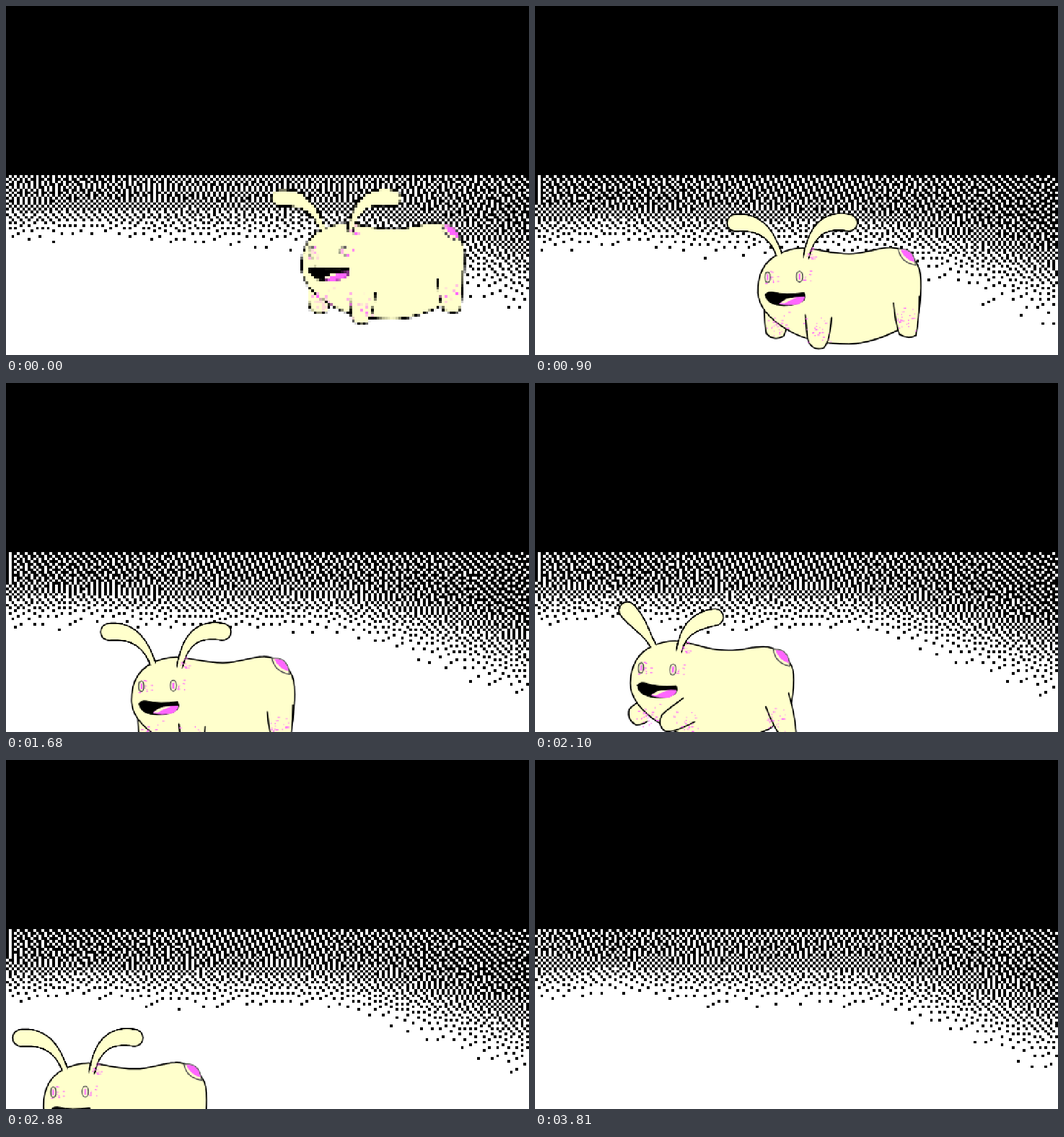
Animation, 917 px wide and 611 px high, one loop 3.87 s. Source, as an HTML page with a canvas:

```html
<!DOCTYPE html>
<html lang="en">
<head>
<meta charset="utf-8">
<title>Hopping bunny</title>
<style>
html, body { margin: 0; width: 100%; height: 100%; overflow: hidden; background: #000; }
canvas { display: block; width: 100%; height: 100%; image-rendering: pixelated; }
</style>
</head>
<body>
<canvas id="stage" width="917" height="611"></canvas>
<script>
const W = 917, H = 611, COLS = 192, ROWS = 128, CELL = W / COLS, HORIZON = 62;
const LOOP = 3870, STEP = 30, EXIT = 3810;
const GLOW = 1245;                          // one pulse of the floor light
const GAIT = 2310, STRIDE = 379, SET_OFF = 570;
const CREAM = '#ffffcc', PINK = '#ff66ff', GREY = '#555555';

const stage = document.getElementById('stage').getContext('2d');
stage.imageSmoothingEnabled = false;

function layer(width, height) {
  const c = document.createElement('canvas');
  c.width = width;
  c.height = height;
  const ctx = c.getContext('2d');
  ctx.imageSmoothingEnabled = false;
  return ctx;
}
const floor = layer(COLS, ROWS);
const sprite = layer(COLS * 3, ROWS * 3);
const coarse = layer(COLS, ROWS);
const dots = floor.createImageData(COLS, ROWS);

const clamp = v => Math.min(1, Math.max(0, v));
const smooth = v => (v = clamp(v), v * v * (3 - 2 * v));
const arc = (v, from, to) => Math.sin(Math.PI * clamp((v - from) / (to - from)));
const mix = (a, b, k) => a + (b - a) * k;

// Brightness of the floor: px runs 0..1 across, drop is the distance below the horizon.
function floorLight(px, drop, dark) {
  const hill = Math.exp(-(((px - .15) / .1) ** 2));
  const reach = 142 + 18 * dark - 20 * hill + 140 * Math.max(0, (px - .6) / .4) ** 1.3;
  const base = .47 - .07 * dark - .05 * hill - .12 * px ** 6;
  return mix(base, 1, smooth((drop / reach - .22) / .78));
}

// The light becomes black and white cells by error diffusion.
function drawFloor(t) {
  const dark = Math.sqrt(Math.sin(Math.PI * (t % GLOW) / GLOW));
  let row = new Float32Array(COLS + 2), next = new Float32Array(COLS + 2);
  for (let y = 0; y < ROWS; y++) {
    for (let x = 0; x < COLS; x++) {
      let on = 0;
      if (y >= HORIZON) {
        const want = floorLight(x / COLS, (y - HORIZON) * CELL, dark) + row[x + 1];
        on = want > .5 ? 1 : 0;
        const err = (want - on) / 16;
        row[x + 2] += err * 7;
        next[x] += err * 3;
        next[x + 1] += err * 5;
        next[x + 2] += err;
      }
      const i = (y * COLS + x) * 4;
      dots.data.fill(on * 255, i, i + 3);
      dots.data[i + 3] = 255;
    }
    [row, next] = [next, row.fill(0)];
  }
  floor.putImageData(dots, 0, 0);
  stage.drawImage(floor.canvas, 0, 0, W, H);
}

// Each gait is a slow walk, a quick leap that lands nose down, and a soft hop, nose up.
function poseAt(t) {
  const cycles = (t - SET_OFF) / GAIT;
  const phase = cycles - Math.floor(cycles);
  const leap = arc(phase, .2, .37), hop = arc(phase, .57, .755);
  const surge = 82 * smooth((phase - .2) / .08) * (1 - phase);
  return {
    distance: STRIDE * cycles + surge,
    height: 23 * leap + 41 * hop,
    pitch: .07 * (hop - leap),
    lift: leap + .75 * hop,
    hind: .7 * leap + .35 * hop,
    front: .6 * leap + .95 * hop
  };
}

const shape = d => new Path2D(d);
const body = shape('M480 417C455 430 444 455 445 485C447 510 465 530 495 548C530 570 570 574 605 574' +
  'C640 573 670 560 692 549L727 520C733 475 733 445 723 432C712 412 690 404 675 405' +
  'C650 406 635 416 605 416C575 416 560 410 542 408C520 403 500 407 480 417Z');
const farLeg = shape('M456 515C457 530 457 545 460 556Q474 570 490 560Q495 552 495 540');
const nearLeg = shape('M528 523C531 548 530 560 534 571Q544 587 560 581Q571 572 574 528');
const hindLeg = shape('M683 502C685 530 689 545 693 557Q708 566 722 559Q728 530 728 490');
const mouth = shape('M458 488Q461 481 472 483Q492 489 526 484Q530 490 526 497Q515 507 490 507Q460 506 458 488Z');
const tongue = shape('M482 504Q495 491 527 491Q528 499 515 505Q495 508 482 504Z');
const teeth = shape('M484 503Q495 491 514 493Q500 497 492 503Z');
const tail = shape('M691 408Q718 404 722 436Q696 432 691 408Z');
const tailTop = shape('M695 409Q716 407 720 431Q702 426 695 409Z');

let seed = 7;
const random = () => (seed = seed * 16807 % 2147483647) / 2147483647;
const scatter = reach => (random() + random() - 1) * reach;

// Blush speckles gather on the legs and the face.
const speckles = ['700 530', '550 550', '475 540', '470 458', '528 455', '535 417'].flatMap(spot => {
  const [x, y] = spot.split(' ').map(Number);
  const size = y > 500 ? 26 : 13;
  return Array.from({ length: size }, () => [x + scatter(size), y + scatter(size), random() < .35 ? 4 : 1.8]);
});

function ink(path, fill = CREAM, line = '#000', width = 2.4) {
  sprite.fillStyle = fill;
  sprite.fill(path);
  sprite.strokeStyle = line;
  sprite.lineWidth = width;
  sprite.stroke(path);
}

function limb(path, x, y, angle) {
  sprite.save();
  sprite.translate(x, y);
  sprite.rotate(angle);
  sprite.translate(-x, -y);
  ink(path);
  sprite.restore();
}

// A run of growing discs along a bent spine; the fill starts lower so the root stays open.
function ear(root, bend, tip) {
  const run = (from, grow, colour) => {
    sprite.fillStyle = colour;
    for (let k = from; k <= 1; k += .01) {
      const at = i => mix(mix(root[i], bend[i], k), mix(bend[i], tip[i], k), k);
      sprite.beginPath();
      sprite.arc(at(0), at(1), 5 + 9.5 * smooth(k * 1.1) + grow, 0, 7);
      sprite.fill();
    }
  };
  run(0, 1.2, '#000');
  run(-.12, -1.2, CREAM);
}

function eye(x, y, rx, ry) {
  const rim = new Path2D();
  rim.ellipse(x, y, rx, ry, 0, 0, 7);
  ink(rim, CREAM, GREY, 2);
  sprite.fillStyle = PINK;
  sprite.fillRect(x - 1.5, y - 5, 3, 10);
}

function drawBunny(t) {
  const { distance, height, pitch, lift, hind, front } = poseAt(t);
  const { width, height: rows } = sprite.canvas;
  sprite.setTransform(1, 0, 0, 1, 0, 0);
  sprite.clearRect(0, 0, width, rows);
  sprite.scale(width / W, rows / H);
  sprite.translate(590 - distance, 490 + distance * .329 - height);
  sprite.rotate(pitch);
  sprite.translate(-590, -490);
  sprite.lineJoin = sprite.lineCap = 'round';

  limb(farLeg, 478, 530, front);
  ink(body);
  limb(nearLeg, 552, 525, front);
  limb(hindLeg, 705, 500, -hind);
  ink(tail, CREAM, GREY, 2);
  sprite.fillStyle = PINK;
  sprite.fill(tailTop);
  ear([mix(481, 478, lift), 414], [mix(458, 460, lift), mix(356, 394, lift)], [mix(404, 439, lift), mix(362, 356, lift)]);
  ear([mix(530, 526, lift), 420], [mix(545, 530, lift), mix(350, 378, lift)], [mix(606, 580, lift), mix(362, 358, lift)]);
  sprite.fillStyle = PINK;
  for (const [x, y, w] of speckles) sprite.fillRect(x, y, w, 1.6);
  eye(462, 457, 4.5, 9);
  eye(518, 456, 5.5, 9.5);
  ink(mouth, '#000', '#000', 1.5);
  sprite.fillStyle = PINK;
  sprite.fill(tongue);
  sprite.fillStyle = CREAM;
  sprite.fill(teeth);

  // The bunny first appears in cells as coarse as the floor's.
  let picture = sprite.canvas;
  if (t < STEP) {
    coarse.clearRect(0, 0, COLS, ROWS);
    coarse.drawImage(picture, 0, 0, COLS, ROWS);
    picture = coarse.canvas;
  }
  stage.drawImage(picture, 0, 0, W, H);
}

const start = performance.now();
let shown = -1;
function render() {
  const elapsed = (performance.now() - start) % LOOP;
  const t = Math.min(EXIT, Math.floor(elapsed / STEP) * STEP);
  if (t !== shown) {
    shown = t;
    drawFloor(t);
    if (t < EXIT) drawBunny(t);
  }
  requestAnimationFrame(render);
}
render();
</script>
</body>
</html>
```
